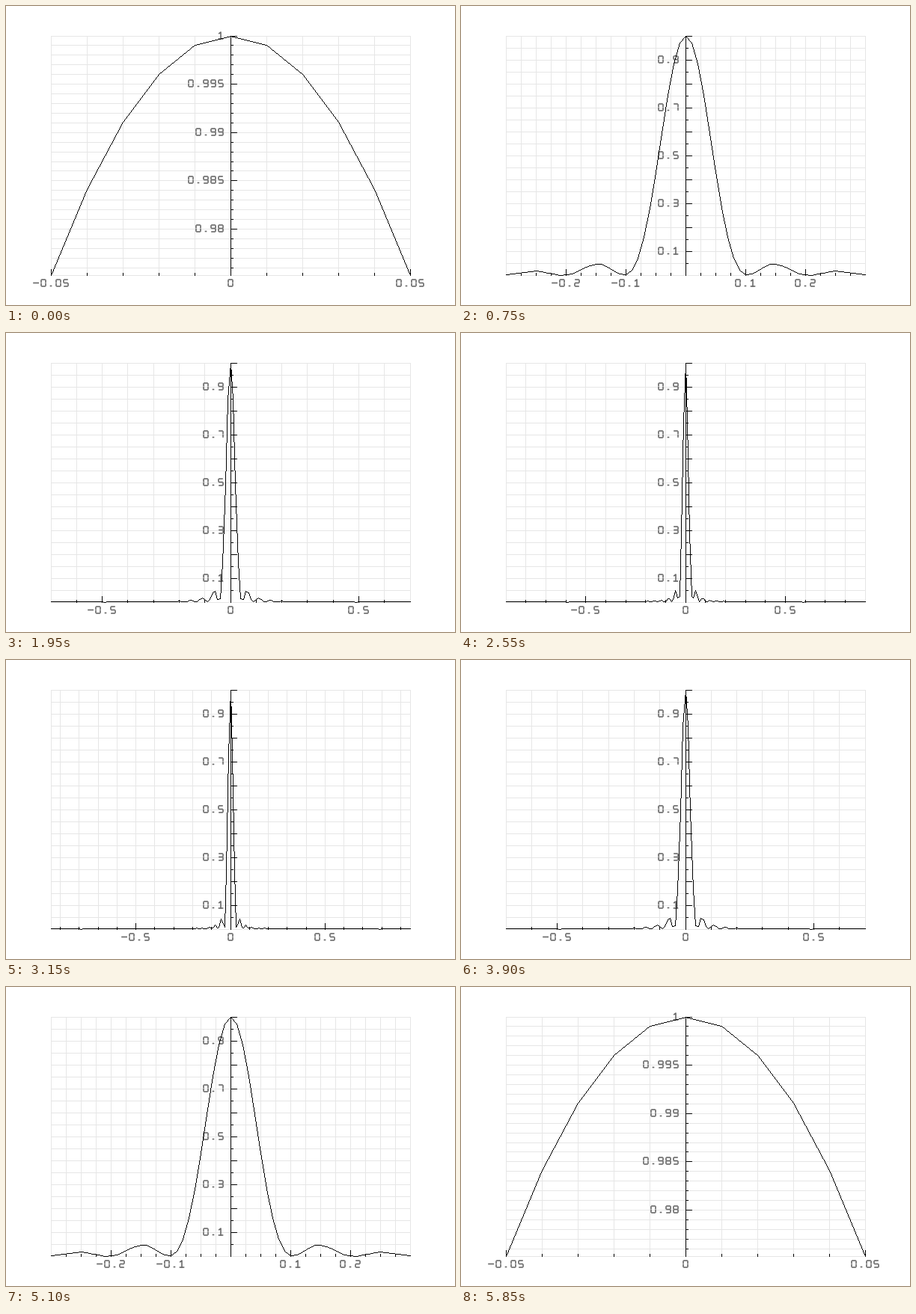
Write a matplotlib script that moves like this. It is 600x400 px and loops after 6 s.

```python
import math

import matplotlib.pyplot as plt
import numpy as np
from matplotlib.animation import FuncAnimation
from matplotlib.collections import LineCollection

W, H, DPI = 600, 400, 100
LEFT, RIGHT, TOP, BOTTOM, MID = 60, 540, 40, 360, 300
STEPS = 20
PX = 72 / DPI
CELL = 10

# Strokes of the box-shaped digits, relative to the cell's left edge and middle
STROKES = {
    "a": [(3, -4.5), (7, -4.5)],
    "b": [(8, -3.5), (8, -1)],
    "c": [(8, 1), (8, 3.5)],
    "d": [(3, 4.5), (7, 4.5)],
    "e": [(2, 1), (2, 3.5)],
    "f": [(2, -3.5), (2, -1)],
    "g": [(3, 0), (7, 0)],
    "m": [(2, 0), (8.2, 0)],
    "p": [(4.5, 4), (5.5, 4)],
    "s": [(2.8, -2.8), (5, -4.5), (5, 4.5)],
    "t": [(2.5, 4.5), (7.5, 4.5)],
}
GLYPHS = {
    "0": "abcdef", "1": "st", "2": "abged", "3": "abgcd", "4": "fgbc",
    "5": "afgcd", "6": "afgecd", "7": "abc", "8": "abcdefg", "9": "abcdfg",
    "-": "m", ".": "p",
}


def text_lines(text, x, y):
    """Strokes of a label whose first cell starts at x, centred on y."""
    return [[(x + i * CELL + dx, y + dy) for dx, dy in STROKES[s]]
            for i, ch in enumerate(text) for s in GLYPHS[ch]]


def ticks(lo, hi):
    """Return a list of (value, is_long, has_label) and whether steps are by one."""
    span = hi - lo
    base = 10 ** math.floor(math.log10(span))
    ratio = span / base
    if ratio < 2.6:
        sub, per_major, every = 0.1 * base, 5, 1
    elif ratio < 7.5:
        sub, per_major, every = 0.25 * base, 4, 1
    else:
        sub, per_major, every = 0.5 * base, 2, 2
    first = math.ceil(lo / (sub * per_major))
    marks = []
    for i in range(math.ceil(lo / sub), math.floor(hi / sub) + 1):
        is_long = i % per_major == 0
        labelled = is_long and (i // per_major - first) % every == 0
        marks.append((i * sub, is_long, labelled))
    return marks, per_major == 4


def kernel(x, n):
    """Squared, normalised sum of 2n + 1 equally spaced waves."""
    safe = np.where(x == 0, 1, x)
    value = np.sin((n + 0.5) * safe) / ((2 * n + 1) * np.sin(safe / 2))
    return np.where(x == 0, 1, value ** 2)


def hline(y, x0, x1):
    return [(x0, y + 0.5), (x1, y + 0.5)]


def vline(x, y0, y1):
    return [(x + 0.5, y0), (x + 0.5, y1)]


def pixel_path(xs, ys):
    """Hard-edged one-pixel line through whole-pixel points."""
    pixels = set()
    for x0, y0, x1, y1 in zip(xs, ys, xs[1:], ys[1:]):
        count = int(max(abs(x1 - x0), abs(y1 - y0))) + 1
        px = np.floor(np.linspace(x0, x1, count) + 0.5)
        py = np.floor(np.linspace(y0, y1, count) + 0.5)
        pixels.update(zip(px, py))
    return [hline(y, x, x + 1) for x, y in sorted(pixels)]


def label(value):
    return f"{round(value, 6):g}"


fig = plt.figure(figsize=(W / DPI, H / DPI), dpi=DPI, facecolor="white")
ax = fig.add_axes([0, 0, 1, 1])
ax.set_xlim(0, W)
ax.set_ylim(H, 0)
ax.axis("off")


def add_lines(color, width, z, cap="butt"):
    lines = LineCollection([], colors=color, linewidths=width * PX,
                           capstyle=cap, zorder=z)
    lines.set_snap(False)
    ax.add_collection(lines, autolim=False)
    return lines


grid = add_lines("#e6e6e6", 1, 1)
labels = add_lines("#666666", 1.6, 2, "projecting")
axis = add_lines("black", 1, 3)
curve = add_lines("black", 1, 4)


def draw(frame):
    n = 5 * (min(frame, 2 * STEPS - 1 - frame) + 1)
    reach = n / 100
    x = np.arange(-n, n + 1) / 100
    y = kernel(x, n)
    low = y.min()
    height = 1 - low

    def to_x(v):
        return np.floor(MID + (RIGHT - MID) * v / reach + 1e-6)

    def to_y(v):
        return np.floor(BOTTOM - (BOTTOM - TOP) * (v - low) / height + 1e-6)

    net = {("h", TOP), ("h", BOTTOM), ("v", LEFT), ("v", RIGHT)}
    marks = [vline(MID, TOP, BOTTOM + 1)]
    strokes = []

    # Marks on the outer edge appear only at whole powers of ten
    edge = reach * (1 + (1e-6 if n in (5, 50) else -1e-6))
    x_ticks, quarters = ticks(-edge, edge)
    for v, is_long, labelled in x_ticks:
        px = to_x(v)
        net.add(("v", px))
        marks.append(vline(px, BOTTOM - (8 if is_long else 3), BOTTOM + 1))
        if labelled and not (quarters and abs(v) < 1e-9):
            text = label(v)
            strokes += text_lines(text, px - CELL * len(text) / 2, BOTTOM + 10.5)

    y_ticks, _ = ticks(low + 1e-5 * height, 1 + 1e-6 * height)
    for v, is_long, labelled in y_ticks:
        py = to_y(v)
        net.add(("h", py))
        marks.append(hline(py, MID, MID + (9 if is_long else 4)))
        if labelled:
            text = label(v)
            strokes += text_lines(text, MID - 8 - CELL * len(text), py - 0.5)

    grid.set_segments([hline(p, LEFT, RIGHT + 1) if side == "h"
                       else vline(p, TOP, BOTTOM + 1) for side, p in sorted(net)])
    axis.set_segments(marks)
    labels.set_segments(strokes)
    curve.set_segments(pixel_path(to_x(x), to_y(y)))
    return grid, labels, axis, curve


anim = FuncAnimation(fig, draw, frames=2 * STEPS, interval=150,
                     init_func=lambda: draw(0), repeat=True, repeat_delay=0)
plt.show()
```
